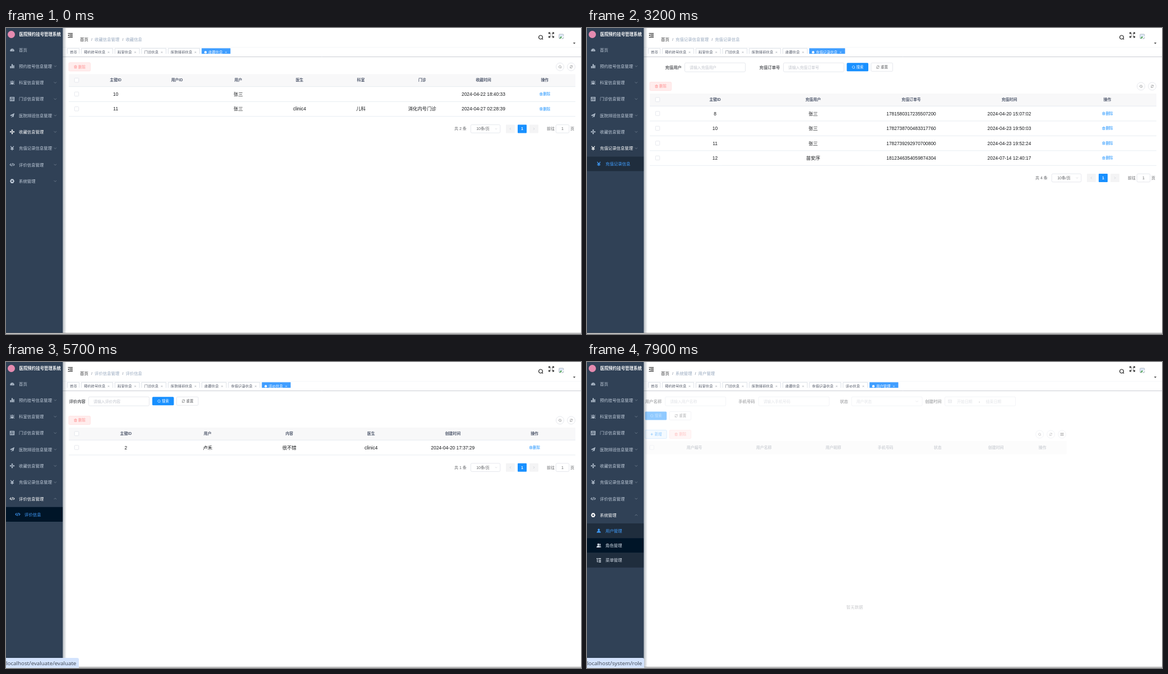
Animation of 1026 by 546 pixels, one loop 8 s. Source, as an HTML page with a canvas:

```html
<!DOCTYPE html>
<html lang="zh-CN">
<head>
<meta charset="utf-8">
<title>医院预约挂号管理系统</title>
<style>
html, body { margin: 0; width: 100%; height: 100%; overflow: hidden; background: #fff; }
canvas { display: block; width: 1026px; height: 546px; }
</style>
</head>
<body>
<canvas id="stage"></canvas>
<script>
const W = 1026, H = 546, LOOP = 8000;
const SANS = '"Liberation Sans","Noto Sans CJK SC","Noto Sans CJK",sans-serif';
const BLUE = '#1890ff', GREY = '#606266', PALE = '#c0c4cc', LINE = '#dcdfe6';
const canvas = document.getElementById('stage');
const dpr = window.devicePixelRatio || 1;
canvas.width = W * dpr;
canvas.height = H * dpr;
const c = canvas.getContext('2d');

// ---------- timing ----------
const clamp = v => Math.max(0, Math.min(1, v));
const between = (t, a, b) => t >= a && t < b;

function bezier(x1, y1, x2, y2) {
  const at = (a, b, u) => 3 * a * u * (1 - u) ** 2 + 3 * b * u * u * (1 - u) + u ** 3;
  return x => {
    let lo = 0, hi = 1;
    for (let i = 0; i < 20; i++) {
      const mid = (lo + hi) / 2;
      if (at(x1, x2, mid) < x) lo = mid; else hi = mid;
    }
    return at(y1, y2, lo);
  };
}
const ease = bezier(.25, .1, .25, 1);
const easeInOut = bezier(.42, 0, .58, 1);
const ramp = (t, from, len, curve = ease) => curve(clamp((t - from) / len));

// ---------- drawing helpers ----------
function text(s, x, y, size, color, align = 'left', weight = 400, font = SANS) {
  c.font = `${weight} ${size}px ${font}`;
  c.textAlign = align;
  c.fillStyle = color;
  c.fillText(s, x, y + size * .37);
}

function box(x, y, w, h, fill, stroke, r = 0) {
  c.beginPath();
  c.roundRect(x, y, w, h, r);
  if (fill) { c.fillStyle = fill; c.fill(); }
  if (stroke) { c.strokeStyle = stroke; c.lineWidth = .7; c.stroke(); }
}

function line(x1, y1, x2, y2, color, width = .7) {
  c.beginPath();
  c.moveTo(x1, y1);
  c.lineTo(x2, y2);
  c.strokeStyle = color;
  c.lineWidth = width;
  c.stroke();
}

function disc(x, y, r, fill, stroke) {
  c.beginPath();
  c.arc(x, y, r, 0, Math.PI * 2);
  if (fill) { c.fillStyle = fill; c.fill(); }
  if (stroke) { c.strokeStyle = stroke; c.lineWidth = .7; c.stroke(); }
}

// Icons live on a grid from -5 to 5.
const ICONS = {
  dash: ['M-4.5 3.5A4.7 4.7 0 1 1 4.5 3.5ZM-.7 2L.7 2L1.6-2ZM-3.4 0h1.2v1.2h-1.2ZM2.3 0h1.2v1.2h-1.2ZM-1.6-2.6h1.2v1.2h-1.2Z', 1],
  bars: ['M-4.5 0h2.3v4.5h-2.3ZM-1.2-4.5h2.4v9h-2.4ZM2.2-2h2.3v6.5h-2.3Z', 1],
  bug: ['M-1.8-2.6a1.8 1.8 0 0 1 3.6 0ZM-2.6-1.8h5.2v3.6a2.6 2.6 0 0 1-5.2 0ZM-5-.2h10v.9h-10ZM-4.6-4l2.8 2.4-.6.7-2.8-2.4ZM4.6-4l-2.8 2.4.6.7 2.8-2.4ZM-4.6 4.4l2.6-2.2-.6-.7-2.6 2.2ZM4.6 4.4l-2.6-2.2.6-.7 2.6 2.2Z', 1],
  form: ['M-4.5-4h9v8h-9ZM-4.5-1.5h9M-2.5 .6h2M1 .6h2M-2.5 2.4h2M1 2.4h2', 0],
  plane: ['M5-5L2.5 4L-.4 1.9L3-2.6L-1.8 1.3L-5 0ZM-1.6 2.2L.2 3.4L-1.6 5Z', 1],
  move: ['M-4 0h8M0-4v8M-1.4-3L0-4.6L1.4-3M-1.4 3L0 4.6L1.4 3M-3-1.4L-4.6 0L-3 1.4M3-1.4L4.6 0L3 1.4', 0],
  yen: ['M-3.6-4.6L0-.2L3.6-4.6M0-.2V4.8M-3.4 .2h6.8M-3.4 2.4h6.8', 0],
  code: ['M-2.4-2.6L-4.9 0L-2.4 2.6M2.4-2.6L4.9 0L2.4 2.6M.9-3.4L-.9 3.4', 0],
  gear: ['M-2.4-4.6h4.8L5 0L2.4 4.6h-4.8L-5 0ZM0-1.9a1.9 1.9 0 1 0 .01 0Z', 1],
  user: ['M0-4.6a2.3 2.5 0 1 1-.01 0ZM-4.6 4.4c0-3 2-4 4.6-4s4.6 1 4.6 4Z', 1],
  people: ['M-1-4.6a2.3 2.5 0 1 1-.01 0ZM-5 4.4c0-3 2-4 4-4s4 1 4 4ZM2-4.2a2.2 2.2 0 0 1 .2 4.4c2 .5 2.8 1.6 2.8 4.2h-1.4c0-2-.6-3-1.8-3.9Z', 1],
  tree: ['M-5-4.6h3v2h-3ZM-1-4.6h6v2h-6ZM0-1h5v2h-5ZM0 2.6h5v2h-5ZM-4-2v6h3v-1h-2v-2.500h2v-1h-2v-1.500Z', 1],
  trash: ['M-4.4-2.8h8.8M-3.3-2.8v7.200h6.600v-7.200M-1.500-4.500h3M-1.200-.8v3.200M1.200-.8v3.200', 0],
  find: ['M0-4a4 4 0 1 1-.01 0M2.900 2.900L4.800 4.800', 0],
  reload: ['M-4-1A4 4 0 0 1 3.600-2M4 1A4 4 0 0 1-3.600 2M3.800-4.500V-1.800H1.200M-3.800 4.500V1.800H-1.200', 0],
  plus: ['M-4 0h8M0-4v8', 0],
  cross: ['M-3-3L3 3M3-3L-3 3', 0],
  down: ['M-4-2L0 2L4-2', 0],
  up: ['M-4 2L0-2L4 2', 0],
  left: ['M2-4L-2 0L2 4', 0],
  right: ['M-2-4L2 0L-2 4', 0],
  full: ['M-1.300-1.300L-4.300-4.300M-4.600-1.800V-4.600H-1.800M1.300-1.300L4.300-4.300M4.600-1.800V-4.600H1.800M-1.300 1.300L-4.300 4.300M-4.600 1.800V4.600H-1.800M1.300 1.300L4.300 4.300M4.600 1.800V4.600H1.800', 0],
  grid: ['M-4-4h3v3h-3ZM1-4h3v3h-3ZM-4 1h3v3h-3ZM1 1h3v3h-3Z', 1]
};
for (const k in ICONS) ICONS[k][0] = new Path2D(ICONS[k][0]);

function icon(name, x, y, size, color, weight = 1.1) {
  const [path, solid] = ICONS[name];
  c.save();
  c.translate(x, y);
  c.scale(size / 10, size / 10);
  if (solid) { c.fillStyle = color; c.fill(path, 'evenodd'); }
  else { c.strokeStyle = color; c.lineWidth = weight; c.stroke(path); }
  c.restore();
}

// ---------- data ----------
const MENU = [
  ['首页', 'dash'], ['预约挂号信息管理', 'bars'], ['科室信息管理', 'bug'],
  ['门诊信息管理', 'form'], ['医院排班信息管理', 'plane'], ['收藏信息管理', 'move'],
  ['充值记录信息管理', 'yen'], ['评价信息管理', 'code'], ['系统管理', 'gear']
];
const SUBS = {
  6: { items: [['充值记录信息', 'yen']], open: 900, close: 3200 },
  7: { items: [['评价信息', 'code']], open: 4080, close: 6000 },
  8: { items: [['用户管理', 'user'], ['角色管理', 'people'], ['菜单管理', 'tree']], open: 6740, close: 1e5 }
};
const TABS = ['首页', '预约挂号信息', '科室信息', '门诊信息', '医院排班信息', '收藏信息', '充值记录信息', '评价信息', '用户管理'];
const PAGES = [
  {
    menu: 5, crumb: ['收藏信息管理', '收藏信息'], click: -2000, ready: -1, head: 82.3,
    cols: ['主键ID', '用户ID', '用户', '医生', '科室', '门诊', '收藏时间', '操作'],
    rows: [
      ['10', '', '张三', '', '', '', '2024-04-22 18:40:33'],
      ['11', '', '张三', 'clinic4', '儿科', '消化内号门诊', '2024-04-27 02:28:39']
    ]
  },
  {
    menu: 6, crumb: ['充值记录信息管理', '充值记录信息'], click: 1540, ready: 2450, head: 117,
    form: [['充值用户', 169, 174.5], ['充值订单号', 344.5, 350.5]], buttons: 463.5,
    cols: ['主键ID', '充值用户', '充值订单号', '充值时间', '操作'],
    rows: [
      ['8', '张三', '1781580317235507200', '2024-04-20 15:07:02'],
      ['10', '张三', '1782738700483317760', '2024-04-23 19:50:03'],
      ['11', '张三', '1782739292970700800', '2024-04-23 19:52:24'],
      ['12', '苗安序', '1812346354059874304', '2024-07-14 12:40:17']
    ]
  },
  {
    menu: 7, crumb: ['评价信息管理', '评价信息'], click: 4700, ready: 5650, head: 117,
    form: [['评价内容', 142, 147.5]], buttons: 261,
    cols: ['主键ID', '用户', '内容', '医生', '创建时间', '操作'],
    rows: [['2', '卢禾', '很不错', 'clinic4', '2024-04-20 17:37:29']]
  },
  { menu: 8, crumb: ['系统管理', '用户管理'], click: 7260, users: true }
];
const LEAVE = 500, SHIFT = 16;
const STATUS = [
  [1500, 2600, 'localhost/pay/pay', 86],
  [4700, 5900, 'localhost/evaluate/evaluate', 130],
  [7200, 7550, 'localhost/system/user', 103],
  [7550, 8000, 'localhost/system/role', 102]
];
const TITLE_HOVER = [[500, 1250, 6], [2600, 4100, 6], [4100, 4400, 7], [5900, 6800, 7], [6800, 7000, 8]];
const SUB_HOVER = [[1250, 2600, 6, 0], [4400, 5900, 7, 0], [7000, 7550, 8, 0], [7550, 8000, 8, 1]];
// Items under an open submenu stay blank after its link is clicked.
const BLANK = [[1540, 3260, 6], [4700, 6050, 7]];

// ---------- page content ----------
function button(x, y, label, name, ink, fill, border, w = 38.5) {
  box(x, y - 7.5, w, 15, fill, border, 1.6);
  icon(name, x + 12, y, 5.5, ink, 1.3);
  text(label, x + 17, y, 6.5, ink);
}
const deleteButton = (x, y) => button(x, y, '删除', 'trash', '#ff9292', '#ffeded', '#ffdbdb');
function searchButtons(x, y) {
  button(x, y, '搜索', 'find', '#fff', BLUE);
  button(x + 43.5, y, '重置', 'reload', GREY, '#fff', LINE);
}

function field(x, w, hint, y = 70.2) {
  box(x, y - 8, w, 16, '#fff', LINE, 2);
  text(hint, x + 8.5, y, 6.9, PALE);
}

function tool(x, y, name) {
  disc(x, y, 7, '#fff', LINE);
  icon(name, x, y, 5, GREY, 1.2);
}

const checkbox = (x, y) => box(x - 3.7, y - 3.7, 7.4, 7.4, '#fff', LINE, 1);

function pager(y, total) {
  text(`共 ${total} 条`, 800, y, 7, GREY);
  box(829.3, y - 7.3, 52.5, 14.6, '#fff', LINE, 2);
  text('10条/页', 851, y, 7, GREY, 'center');
  icon('down', 874.5, y, 4, PALE, 1.4);
  box(892, y - 7.5, 16, 15, '#f4f4f5', null, 1);
  icon('left', 900, y, 4.5, PALE, 1.4);
  box(913, y - 7.5, 16, 15, BLUE, null, 1);
  text('1', 921, y, 7, '#fff', 'center', 700);
  box(934, y - 7.5, 16, 15, '#f4f4f5', null, 1);
  icon('right', 942, y, 4.5, PALE, 1.4);
  text('前往', 965, y, 7, GREY);
  box(981.3, y - 7.3, 23.5, 14.6, '#fff', LINE, 2);
  text('1', 993, y, 7, GREY, 'center');
  text('页', 1007, y, 7, GREY);
}

function tablePage(p, t) {
  const toolY = p.head - 13, rowH = 26.45, pitch = 875 / p.cols.length;
  const mid = i => 141 + pitch * (i + .5);
  if (p.form) {
    for (const [label, right, x] of p.form) {
      text(label, right, 70.2, 7.4, GREY, 'right', 700);
      field(x, 108, '请输入' + label);
    }
    searchButtons(p.buttons, 69.8);
  }
  deleteButton(112, toolY);
  tool(988.5, toolY, 'find');
  tool(1008.5, toolY, 'reload');
  box(112, p.head, 904, 22.5, '#f8f8f9');
  line(112, p.head + 22.3, 1016, p.head + 22.3, '#dfe6ec');
  checkbox(126, p.head + 10.8);
  p.cols.forEach((s, i) => text(s, mid(i), p.head + 10.5, 6.9, '#515a6e', 'center', 700));
  if (t < p.ready) {
    text('暂无数据', 564, 412, 7.4, '#909399', 'center');
    return;
  }
  p.rows.forEach((row, r) => {
    const top = p.head + 22.5 + r * rowH, y = top + rowH / 2 - .2;
    if (p.menu === 5 && r === 0 && t > 100) {
      c.save();
      c.globalAlpha *= ramp(t, 100, 300);
      box(112, top, 904, rowH, '#f8faff');
      c.restore();
    }
    line(112, top + rowH, 1016, top + rowH, '#dfe6ec');
    checkbox(126, y);
    row.forEach((s, i) => text(s, mid(i), y, 8.4, '#17191c', 'center'));
    const x = mid(p.cols.length - 1);
    icon('trash', x - 6.5, y, 5.5, BLUE, 1.2);
    text('删除', x - 3, y, 6.5, BLUE);
  });
  pager(p.head + 22.5 + p.rows.length * rowH + 22.2, p.rows.length);
}

function usersPage() {
  const label = (s, x) => text(s, x, 70.2, 7.4, GREY, 'left', 700);
  label('用户名称', 112);
  field(148, 108, '请输入用户名称');
  label('手机号码', 278.5);
  field(314.5, 126, '请输入手机号码');
  label('状态', 459.5);
  field(480.5, 126, '用户状态');
  icon('down', 597, 70.2, 5.5, PALE, 1.3);
  label('创建时间', 611.5);
  field(647, 126, '');
  icon('form', 656, 70.2, 6.5, PALE);
  text('开始日期', 668.5, 70.2, 6.9, PALE);
  text('-', 708.5, 70.2, 7, '#303133', 'center');
  text('结束日期', 720, 70.2, 6.9, PALE);
  searchButtons(112, 96);
  button(112, 129, '新增', 'plus', BLUE, '#e8f4ff', '#a3d3ff');
  deleteButton(155.5, 129);
  tool(816, 129, 'find');
  tool(836, 129, 'reload');
  disc(856, 129, 7, '#fff', LINE);
  icon('grid', 856, 129, 6, '#303133');
  box(112, 141, 752, 23.5, '#f8f8f9');
  checkbox(124, 152.5);
  const heads = { 用户编号: 200, 用户名称: 324, 用户昵称: 448, 手机号码: 541, 状态: 634, 创建时间: 738, 操作: 821 };
  for (const s in heads) text(s, heads[s], 152.5, 6.9, '#a4a9b4', 'center', 700);
  text('暂无数据', 486, 437, 7.4, '#909399', 'center');
}

function content(t) {
  PAGES.forEach((p, i) => {
    const next = PAGES[i + 1], start = p.click + LEAVE;
    if (t < start || (next && t >= next.click + LEAVE)) return;
    const inP = ramp(t, start, LEAVE);
    const outP = next ? ramp(t, next.click, LEAVE) : 0;
    c.save();
    c.globalAlpha = inP * (1 - outP);
    c.translate(SHIFT * (inP - 1 + outP), 0);
    if (p.users) usersPage(); else tablePage(p, t);
    c.restore();
  });
}

// ---------- frame around the page ----------
function crumbs(p, alpha, dx) {
  c.save();
  c.globalAlpha = alpha;
  let x = 152 + dx;
  for (const s of p.crumb) {
    text('/', x, 20.3, 7.4, '#a4abb8', 'left', 700);
    text(s, x + 6, 20.3, 7.4, '#97a8be');
    x += 6 + s.length * 7.4 + 5;
  }
  c.restore();
}

function navbar(t, cur) {
  box(101, 0, W - 101, 51, '#fff');
  for (let i = 0; i < 4; i++) line(i % 3 ? 113.5 : 110.5, 9.7 + i * 2.3, 119, 9.7 + i * 2.3, '#222', 1.1);
  c.fillStyle = '#222';
  c.beginPath();
  c.moveTo(112.600, 11.4); c.lineTo(110.2, 13.1); c.lineTo(112.6, 14.8);
  c.fill();

  text('首页', 132, 20.3, 7.4, '#303133', 'left', 500);
  const k = ramp(t, PAGES[cur].click, LEAVE);
  if (cur && k < 1) crumbs(PAGES[cur - 1], 1 - k, 10 * k);
  crumbs(PAGES[cur], k, 10 * (1 - k));

  icon('find', 954, 16.5, 8.5, '#444', 1.7);
  icon('full', 973, 12.5, 9.5, '#444', 1.4);
  box(986.8, 11, 8, 8, '#dfe9f7', '#9aa5b1', 1);
  c.fillStyle = '#58a55c';
  c.beginPath();
  c.moveTo(987, 18.8); c.lineTo(990.5, 14.5); c.lineTo(993, 18.800);
  c.fill();
  line(990, 19.5, 995.5, 14.5, '#fff', 1.5);
  c.fillStyle = '#444';
  c.beginPath();
  c.moveTo(1011.8, 26); c.lineTo(1016.2, 26); c.lineTo(1014, 28.4);
  c.fill();

  line(101, 34.5, W, 34.5, '#f3f4f6');
  c.save();
  c.beginPath();
  c.rect(101, 35, W - 101, 11);
  c.clip();
  let x = 109;
  TABS.slice(0, 6 + cur).forEach((s, i) => {
    const on = i === 5 + cur;
    const w = s.length * 6.25 + (i ? 19.5 : 9.5) + (on ? 7 : 0);
    const ink = on ? '#fff' : '#495060';
    box(x + .4, 36.4, w - .8, 14, on ? '#409eff' : '#fff', on ? '#409eff' : '#cfd4de');
    if (on) disc(x + 7, 43.2, 2.2, '#fff');
    text(s, x + (on ? 12 : 5), 43.2, 6.4, ink);
    if (i) icon('cross', x + w - 8, 43.4, 4.4, on ? '#fff' : '#8a909b', 1.3);
    x += w + 3;
  });
  c.restore();
  line(101, 51.4, W, 51.4, '#c9ccd3', 1);
}

function subHeight(sub, t) {
  const full = sub.items.length * 26.3;
  return full * (ramp(t, sub.open, 300, easeInOut) - ramp(t, sub.close, 300, easeInOut));
}

function sidebar(t, cur) {
  const shade = c.createLinearGradient(101, 0, 108, 0);
  shade.addColorStop(0, 'rgba(0,21,41,.3)');
  shade.addColorStop(1, 'rgba(0,21,41,0)');
  box(101, 0, 7, 545, shade);
  box(0, 0, 101.3, 545, '#304156');
  disc(9.5, 11.5, 6.5, '#e58bb0');
  text('医院预约挂号管理系统', 23.5, 11.3, 7.45, '#fff', 'left', 700);

  const active = PAGES[cur].menu;
  const blank = BLANK.find(b => between(t, b[0], b[1]));
  const hover = TITLE_HOVER.find(h => between(t, h[0], h[1]));
  const subHover = SUB_HOVER.find(h => between(t, h[0], h[1]));
  let y = 38.8;
  MENU.forEach(([label, name], i) => {
    if (blank && i > blank[2]) return;
    const on = i === active, ink = on ? '#fff' : '#bfcbd9', sub = SUBS[i];
    if (hover && hover[2] === i) box(0, y - 14.7, 101.3, 29.4, 'rgba(0,0,0,.06)');
    icon(name, 11, y, 8, ink, 1.3);
    text(label, 23, y, 7.4, ink, 'left', on ? 500 : 400);
    const h = sub ? subHeight(sub, t) : 0;
    const opened = sub && between(t, sub.open, sub.close);
    if (i) icon(opened ? 'up' : 'down', 87.8, y, 5.5, '#8592a3', 1.2);
    if (h > 0) {
      const top = y + 14.7;
      c.save();
      c.beginPath();
      c.rect(0, top, 101.3, h);
      c.clip();
      sub.items.forEach(([s, mark], j) => {
        const sy = top + j * 26.3;
        const lit = subHover && subHover[2] === i && subHover[3] === j;
        const color = on && j === 0 ? '#409eff' : '#d0d9e4';
        box(0, sy, 101.3, 26.4, lit ? '#001528' : '#1f2d3d');
        icon(mark, 21, sy + 13.2, 8, color, 1.3);
        text(s, 33, sy + 13.2, 7.4, color);
      });
      c.restore();
    }
    y += 29.3 + h;
  });
}

function status(t) {
  const s = STATUS.find(v => between(t, v[0], v[1]));
  if (!s) return;
  box(-1, 528, s[3] + 1, 17.5, '#d3e3fd', null, [0, 3, 0, 0]);
  text(s[2], 0, 537, 9.8, '#3c4450', 'left', 400, '"Open Sans","Noto Sans",sans-serif');
}

function draw(t) {
  const cur = PAGES.filter(p => t >= p.click).length - 1;
  c.setTransform(dpr, 0, 0, dpr, 0, 0);
  box(0, 0, W, H, '#fff');
  content(t);
  navbar(t, cur);
  sidebar(t, cur);
  box(0, 544, W, 1.3, '#8c8c8c');
  status(t);
}

const begin = performance.now();
function tick() {
  draw((performance.now() - begin) % LOOP);
  requestAnimationFrame(tick);
}
tick();
</script>
</body>
</html>
```
